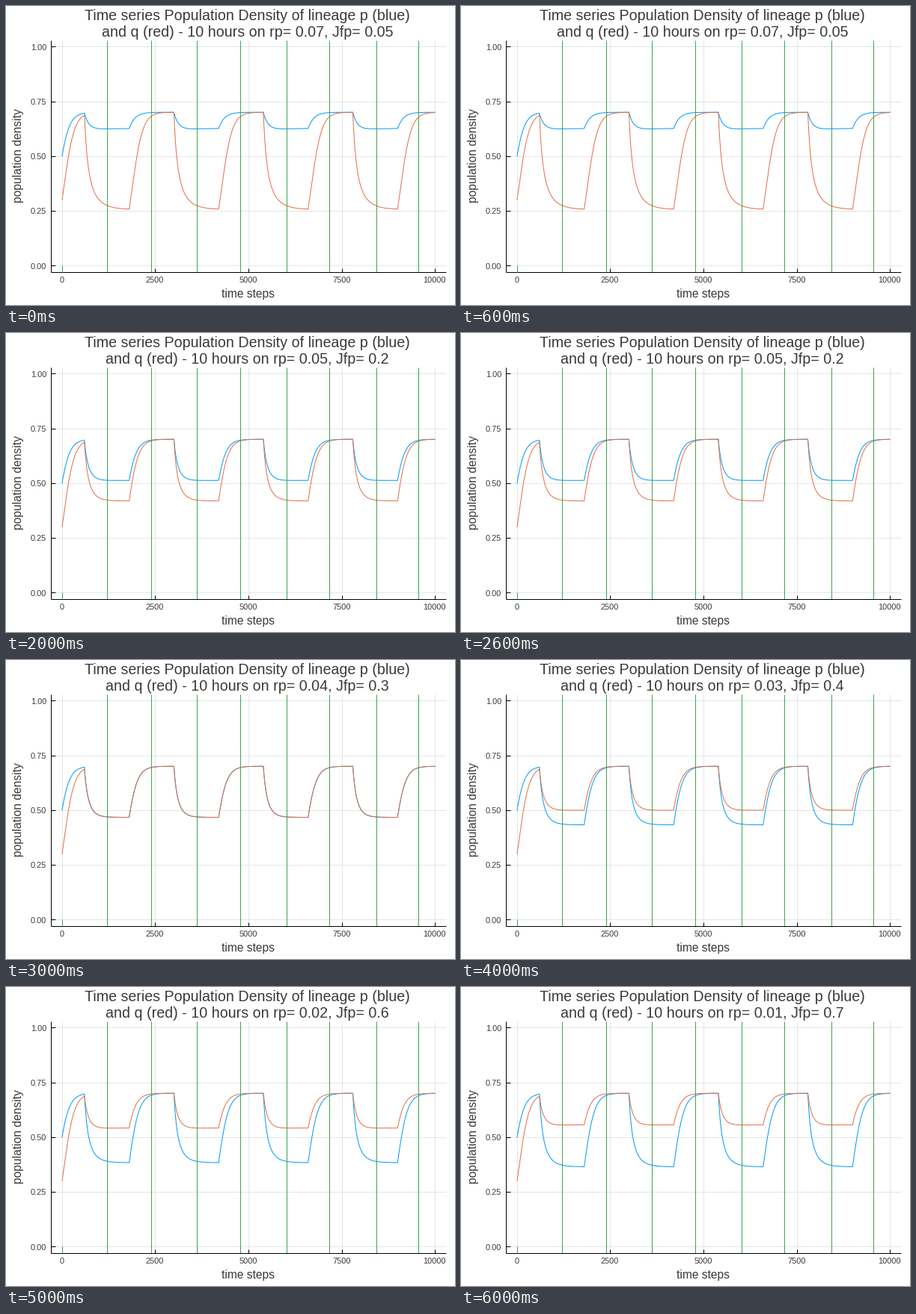
These frames come from a looping animation (600 px wide and 400 px high, 7 s). A matplotlib script:

```python
import matplotlib.pyplot as plt
from matplotlib.animation import FuncAnimation

W, H, DPI = 600, 400, 100
PX = 72 / DPI  # points per pixel
LEFT, RIGHT, TOP, BOTTOM = 60, 588, 45.5, 356

BLUE, RED, GREEN = "#009af9", "#e26f46", "#3da44d"
GRID, INK = "#e5e5e5", "#3a3a3a"

JFP = [0.05, 0.1, 0.2, 0.3, 0.4, 0.6, 0.7]
JFQ = 0.3
STEPS, HALF_DAY, DT, CAPACITY = 10000, 1200, 0.01, 0.7

plt.rcParams["font.family"] = "Liberation Sans"


def sx(t):
    return LEFT + (t + 300) / 10600 * (RIGHT - LEFT)


def sy(v):
    return BOTTOM - (v + 0.03) / 1.06 * (BOTTOM - TOP)


def simulate(jp):
    """Two logistic lineages that compete only in alternating half days."""
    p, q = 0.5, 0.3
    ps, qs = [p], [q]
    for t in range(STEPS):
        active = t >= 600 and (t - 600) % (2 * HALF_DAY) < HALF_DAY
        share = jp * p / (jp * p + JFQ * q)
        loss_p = share * q if active else 0
        loss_q = (1 - share) * p if active else 0
        p, q = (p + DT * p * (CAPACITY - p - loss_p),
                q + DT * q * (CAPACITY - q - loss_q))
        ps.append(p)
        qs.append(q)
    return [sy(v) for v in ps], [sy(v) for v in qs]


fig = plt.figure(figsize=(W / DPI, H / DPI), dpi=DPI, facecolor="white")
ax = fig.add_axes([0, 0, 1, 1])
ax.set_xlim(0, W)
ax.set_ylim(H, 0)
ax.axis("off")


def line(x0, y0, x1, y1, color, z):
    ax.plot([x0, x1], [y0, y1], color=color, lw=PX, zorder=z,
            solid_capstyle="butt")


def label(x, y, text, size, ha="center", **kw):
    return ax.text(x, y, text, fontsize=size * PX, color=INK, ha=ha,
                   va="baseline", **kw)


# Grid, ticks and tick labels
for t in range(0, STEPS + 1, 2500):
    x = sx(t)
    line(x, TOP, x, BOTTOM, GRID, 1)
    line(x, BOTTOM - 5, x, BOTTOM, "black", 5)
    label(x - 0.3, 370, str(t), 11)
for k in range(5):
    v = k / 4
    y = sy(v)
    line(LEFT, y, RIGHT, y, GRID, 1)
    line(LEFT, y, LEFT + 6, y, "black", 5)
    label(54.2, y + 4.4, f"{v:.2f}", 11, ha="right")

line(LEFT, TOP, LEFT, BOTTOM, "black", 5)
line(LEFT, BOTTOM, RIGHT, BOTTOM, "black", 5)

# Half-day markers, drifting outward in pairs
line(sx(0), sy(0), sx(0), BOTTOM, GREEN, 6)
for k in range(8):
    drift = 10 * (k // 2 + 1) * (1 if k % 2 == 0 else -1)
    x = sx(HALF_DAY * (k + 1) + drift)
    line(x, TOP, x, BOTTOM, GREEN, 4)

label(323, 390, "time steps", 15.5)
label(21, 200, "population density", 15.6, rotation=90,
      rotation_mode="anchor")
label(322.6, 19, "Time series Population Density of lineage p (blue)", 19.7)
subtitle = label(322.6, 41, "", 19.7)

times = [sx(t) for t in range(STEPS + 1)]
runs = [simulate(jp) for jp in JFP]
curve_p, = ax.plot([], [], color=BLUE, lw=PX, zorder=2)
curve_q, = ax.plot([], [], color=RED, lw=PX, zorder=3)


def draw(i):
    ps, qs = runs[i]
    curve_p.set_data(times, ps)
    curve_q.set_data(times, qs)
    subtitle.set_text(f"and q (red) - 10 hours on rp= {(7 - i) / 100:g}, "
                      f"Jfp= {JFP[i]:g}")
    return curve_p, curve_q, subtitle


anim = FuncAnimation(fig, draw, frames=len(JFP), interval=1000, repeat=True,
                     repeat_delay=0)
plt.show()
```
